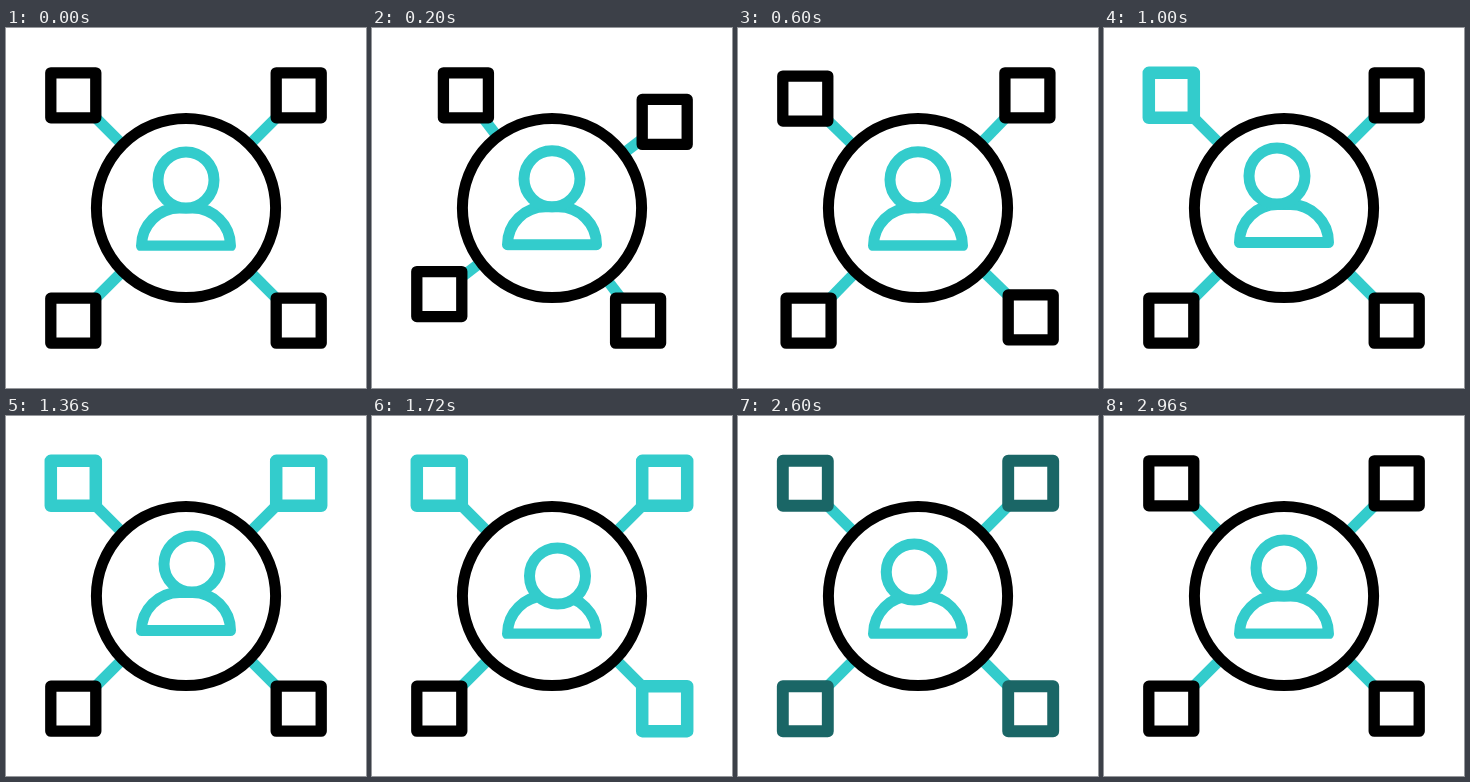
Recreate the animation shown at these times as an HTML page. Size 360x360 px, loop 3000 ms.

```html
<!DOCTYPE html>
<html lang="en">
<head>
<meta charset="utf-8">
<title>Network hub</title>
<style>
  html, body { margin: 0; width: 100%; height: 100%; overflow: hidden; background: #fff; }
  svg { display: block; width: 100vw; height: 100vh; }
</style>
</head>
<body>
<svg viewBox="0 0 360 360" fill="#fff" stroke-width="11" stroke-linejoin="round">
  <clipPath id="floor"><rect width="360" height="222.7"/></clipPath>
  <g id="links" stroke="#33cccc"></g>
  <g id="nodes"></g>
  <circle cx="180" cy="180" r="89.6" stroke="#000"/>
  <g stroke="#33cccc">
    <g clip-path="url(#floor)">
      <path id="body" d="M135.5 218a38 38 0 0 1 38-38h13a38 38 0 0 1 38 38z"/>
    </g>
    <circle id="head" cx="180" cy="152" r="28"/>
  </g>
</svg>
<script>
const LOOP = 3000, FRAME = 40, CENTER = 180, REACH = 112.7, SIDE = 45;
const TEAL = [51, 204, 204];
const CORNERS = [[-1, -1], [1, -1], [1, 1], [-1, 1]];

// Each move: start, end, head x, head y, body y
const MOVES = [
  [80, 360, 0, -3, -3.4],
  [360, 640, 0, 0, 0],
  [720, 920, -7, -4, -3.4],
  [1120, 1320, 6, -4, -3.4],
  [1520, 1720, 5.5, 8, 0],
  [1920, 2120, -7.5, 8, 0],
  [2320, 2880, 0, 0, 0]
];

const byId = id => document.getElementById(id);

function add(parent, tag) {
  const el = document.createElementNS('http://www.w3.org/2000/svg', tag);
  return byId(parent).appendChild(el);
}

function set(el, attrs) {
  for (const name in attrs) el.setAttribute(name, attrs[name]);
}

function ease(t, start, end) {
  const p = Math.min(1, Math.max(0, (t - start) / (end - start)));
  return p * p * (3 - 2 * p);
}

const arms = CORNERS.map(() => ({ link: add('links', 'line'), node: add('nodes', 'rect') }));

function drawArm({ link, node }, i, t) {
  const turn = ease(t, 80, 640);
  const next = CORNERS[(i + 1) % 4];
  const [x, y] = CORNERS[i].map((c, k) => CENTER + REACH * (c + (next[k] - c) * turn));
  set(link, { x1: x, y1: y, x2: CENTER, y2: CENTER });

  // After the turn every node sits on the following corner
  const start = 720 + 400 * ((i + 1) % 4);
  const glow = ease(t, start, start + 200) * (1 - ease(t, 2320, 2880));
  set(node, {
    x: x - SIDE / 2, y: y - SIDE / 2, width: SIDE, height: SIDE,
    stroke: `rgb(${TEAL.map(c => Math.round(c * glow))})`,
    'stroke-width': 11.3 + 1.2 * glow
  });
}

function drawPerson(t) {
  let pose = [0, 0, 0];
  for (const [start, end, ...goal] of MOVES) {
    const p = ease(t, start, end);
    pose = pose.map((v, k) => v + (goal[k] - v) * p);
  }
  const [headX, headY, bodyY] = pose;
  set(byId('head'), { transform: `translate(${headX} ${headY})` });
  set(byId('body'), { transform: `translate(0 ${bodyY})` });
}

function draw(now) {
  const t = Math.floor(now % LOOP / FRAME) * FRAME;
  arms.forEach((arm, i) => drawArm(arm, i, t));
  drawPerson(t);
}

function tick() {
  draw(performance.now());
  requestAnimationFrame(tick);
}
tick();
</script>
</body>
</html>
```
